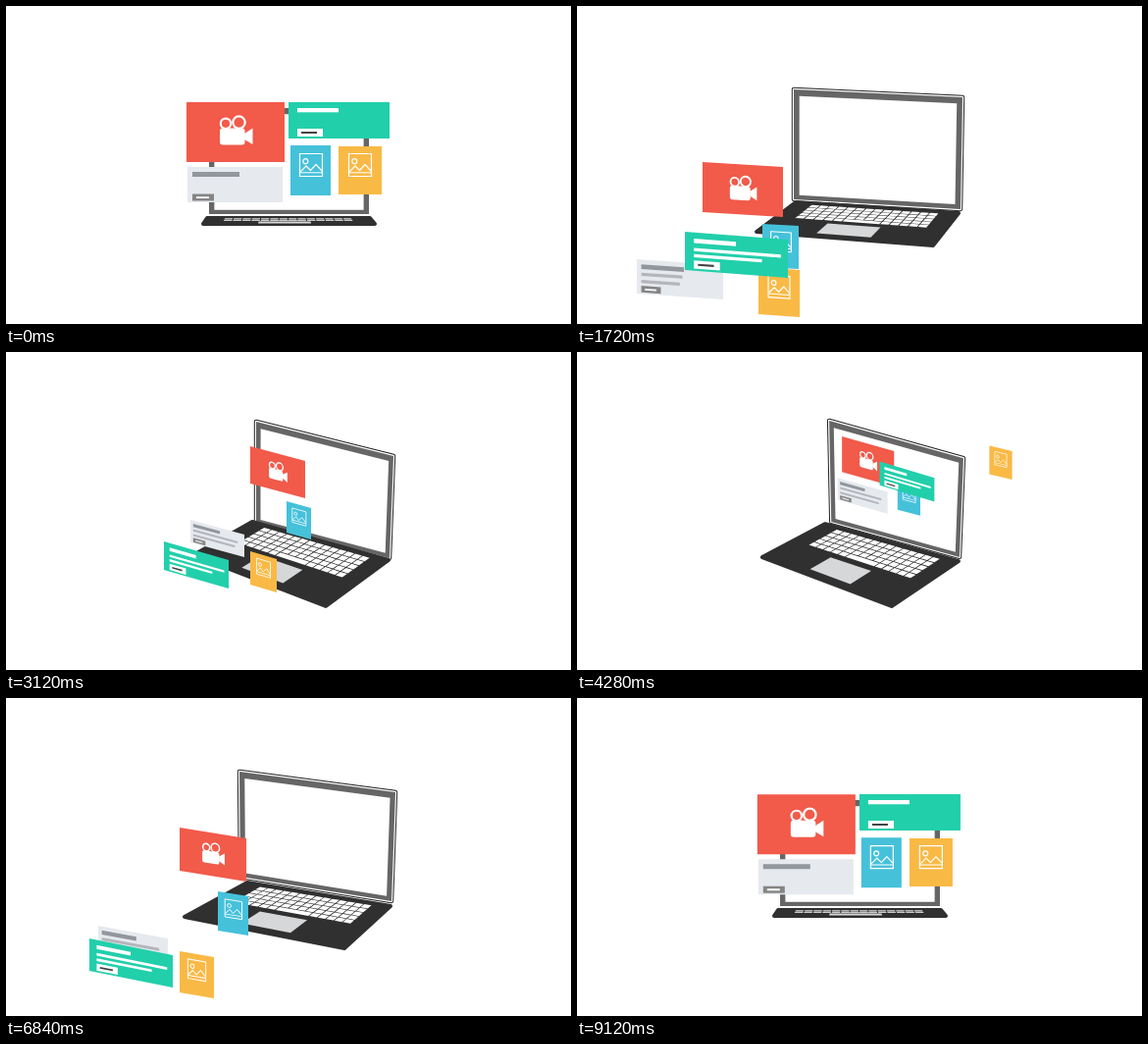
An HTML page with a canvas that plays this animation: 576 px wide and 324 px high, repeating every 9.16 s.

```html
<!DOCTYPE html>
<html lang="en">
<head>
<meta charset="utf-8">
<title>Laptop panels</title>
<style>
html, body { margin: 0; width: 100%; height: 100%; overflow: hidden; background: #fff; }
canvas { display: block; width: 576px; height: 324px; }
</style>
</head>
<body>
<canvas id="stage" width="576" height="324"></canvas>
<script>
const ctx = document.getElementById('stage').getContext('2d');
const LOOP = 9160, STEP = 40;

// The scene plays forward for half the loop, then backward.
const TIMES = [0, 1040, 1720, 2320, 3120, 3720, 4580];

// Corner paths: top left, top right, bottom right, bottom left.
const LID = [
  [207, 104, 370, 104, 370, 212, 207, 212],
  [211, 97, 382, 97, 382, 209, 212, 207],
  [221, 85, 393, 93, 391, 207, 221, 197],
  [238, 75, 397, 96, 393, 207, 239, 182],
  [255, 71, 395, 106, 391, 210, 255, 174],
  [257, 70, 394, 108, 390, 209, 259, 173],
  [257, 70, 394, 108, 390, 209, 259, 173]
];
const BASE = [
  [205, 216, 371, 216, 376, 222, 201, 222],
  [208, 211, 380, 213, 372, 232, 193, 229],
  [223, 200, 389, 211, 363, 244, 183, 230],
  [246, 188, 392, 212, 345, 255, 182, 223],
  [251, 173, 390, 212, 326, 259, 191, 207],
  [253, 175, 389, 213, 321, 259, 189, 209],
  [253, 175, 389, 213, 321, 259, 189, 209]
];

// Panel poses: left, top, width, drop of the top edge, height.
const PANELS = [
  { size: [97, 36], color: '#e6e9ee', art: drawNote, poses: [
    [185, 164, 97, 0, 36], [105, 224, 100, 2, 36], [61, 258, 88, 6, 35],
    [94, 232, 71, 13, 30], [188, 171, 55, 15, 23], [248, 138, 52, 15, 23], [266, 128, 51, 14, 22]] },
  { size: [100, 61], color: '#f25a4a', art: drawCamera, poses: [
    [184, 98, 100, 0, 61], [133, 146, 94, 1, 57], [128, 159, 82, 5, 51],
    [177, 132, 68, 11, 44], [249, 96, 56, 15, 38], [266, 88, 54, 15, 37], [270, 86, 53, 15, 36]] },
  { size: [41, 51], color: '#45c1da', art: () => drawPicture(9, 8), poses: [
    [290, 142, 41, 0, 51], [222, 197, 42, 1, 50], [189, 222, 37, 2, 44],
    [216, 197, 31, 5, 40], [286, 152, 25, 7, 32], [320, 134, 24, 6, 31], [326, 130, 23, 6, 31]] },
  { size: [44, 49], color: '#f9b945', art: () => drawPicture(10, 7), poses: [
    [339, 143, 44, 0, 49], [262, 207, 47, 1, 52], [185, 266, 42, 3, 48],
    [177, 258, 35, 6, 42], [249, 203, 27, 8, 34], [313, 163, 27, 7, 32], [450, 77, 22, 5, 28]] },
  { size: [103, 37], color: '#22cfab', art: drawArticle, poses: [
    [288, 98, 103, 0, 37], [208, 158, 110, 1, 40], [110, 230, 105, 8, 39],
    [85, 245, 85, 17, 33], [161, 193, 66, 19, 29], [245, 147, 60, 19, 26], [322, 104, 55, 16, 24]] }
];

const clamp = v => Math.max(0, Math.min(1, v));

function slope(keys, i, c) {
  if (i === 0 || i === TIMES.length - 1) return 0;
  const a = TIMES[i] - TIMES[i - 1], b = TIMES[i + 1] - TIMES[i];
  const before = (keys[i][c] - keys[i - 1][c]) / a;
  const after = (keys[i + 1][c] - keys[i][c]) / b;
  return (before * b + after * a) / (a + b) * (i === 1 ? 1.5 : 1);
}

// Smooth curve through a list of poses.
function poseAt(keys, t) {
  let i = 0;
  while (i < TIMES.length - 2 && t >= TIMES[i + 1]) i++;
  const span = TIMES[i + 1] - TIMES[i];
  const s = (t - TIMES[i]) / span, r = 1 - s;
  return keys[i].map((v, c) =>
    v * (1 + 2 * s) * r * r + keys[i + 1][c] * s * s * (3 - 2 * s) +
    span * s * r * (slope(keys, i, c) * r - slope(keys, i + 1, c) * s));
}

function bar(x, y, w, h, color) {
  ctx.fillStyle = color;
  ctx.fillRect(x, y, w, h);
}

function trace(points, close) {
  ctx.beginPath();
  points.forEach(([x, y]) => ctx.lineTo(x, y));
  if (close) ctx.closePath();
}

// A rectangle given in fractions of a four-cornered surface.
function patch(q, u0, v0, u1, v1) {
  const at = (u, v) => [0, 1].map(k =>
    (q[k] * (1 - u) + q[k + 2] * u) * (1 - v) + (q[k + 6] * (1 - u) + q[k + 4] * u) * v);
  trace([at(u0, v0), at(u1, v0), at(u1, v1), at(u0, v1)], true);
}

function fillPatch(q, u0, v0, u1, v1, color) {
  patch(q, u0, v0, u1, v1);
  ctx.fillStyle = color;
  ctx.fill();
}

function strokePath(width, color) {
  ctx.lineWidth = width;
  ctx.strokeStyle = color;
  ctx.stroke();
}

function drawLaptop(t) {
  const lid = poseAt(LID, t), base = poseAt(BASE, t);
  ctx.lineJoin = 'round';

  patch(lid, 0, 0, 1, 1);
  ctx.globalAlpha = clamp(t / 1000);
  strokePath(4.4, '#222');
  ctx.globalAlpha = 1;
  strokePath(2.4, '#fff');
  fillPatch(lid, 0, 0, 1, 1, '#666');
  fillPatch(lid, 0.033, 0.058, 0.967, 0.96, '#fff');

  fillPatch(base, 0, 0, 1, 1, '#303030');
  strokePath(4, '#303030');
  const rows = 5, cols = 14, u0 = 0.11, v0 = 0.05;
  const du = 0.78 / cols, dv = 0.45 / rows;
  for (let r = 0; r < rows; r++) {
    for (let c = 0; c < cols; c++) {
      const u = u0 + c * du, v = v0 + r * dv;
      if (r === rows - 1 && c > 4 && c < 9) continue;
      fillPatch(base, u, v, u + du * 0.88, v + dv * 0.86, '#fff');
    }
  }
  const v = v0 + 4 * dv;
  fillPatch(base, u0 + 5 * du, v, u0 + 8.88 * du, v + dv * 0.86, '#fff');
  fillPatch(base, 0.32, 0.58, 0.63, 0.9, '#d6d7d8');
}

function drawCamera() {
  [[40, 21.8, 5.2], [53.5, 20.6, 6.2]].forEach(([x, y, r]) => {
    ctx.beginPath();
    ctx.arc(x, y, r, 0, 7);
    strokePath(2.2, '#fff');
  });
  ctx.fillStyle = '#fff';
  ctx.beginPath();
  ctx.roundRect(34, 26.5, 25.5, 17, 3);
  ctx.fill();
  trace([[59, 32], [67.5, 26.5], [67.5, 43], [59, 38]], true);
  ctx.fill();
}

function drawPicture(x, y) {
  ctx.translate(x, y);
  ctx.beginPath();
  ctx.rect(0.5, 0.5, 23, 23);
  strokePath(1.2, '#fff');
  ctx.beginPath();
  ctx.arc(6.3, 8.2, 2.5, 0, 7);
  strokePath(1.2, '#fff');
  trace([[1, 19], [7, 13], [11.5, 17.5], [17, 11.5], [23, 18]]);
  strokePath(1.2, '#fff');
  bar(1, 19.3, 22, 1, '#fff');
}

function drawArticle(t) {
  const grow = clamp((t - 400) / 900);
  bar(9, 6, 42, 4.3, '#fff');
  bar(9, 15, 87 * grow, 3, '#fff');
  bar(9, 21, 68 * grow, 3, '#fff');
  bar(9, 27, 26, 8, '#fff');
  bar(13, 30, 16, 2, '#444');
}

function drawNote(t) {
  const grow = clamp((t - 970) / 1300);
  bar(5, 5, 48, 5, '#92969d');
  bar(5, 13.7, 80 * grow, 3.4, '#b4b6bc');
  bar(5, 21.3, 75 * grow, 3.4, '#b4b6bc');
  bar(5, 27.5, 22, 7, '#858585');
  bar(9, 30.2, 13, 1.8, '#fff');
}

function drawPanel(panel, t) {
  const [x, y, w, drop, h] = poseAt(panel.poses, t);
  const [pw, ph] = panel.size;
  ctx.save();
  ctx.transform(w / pw, drop / pw, 0, h / ph, x, y);
  bar(0, 0, pw, ph, panel.color);
  panel.art(t);
  ctx.restore();
}

function frame() {
  const now = Math.floor(performance.now() % LOOP / STEP) * STEP;
  const t = Math.min(now, LOOP - now);
  bar(0, 0, 576, 324, '#fff');
  drawLaptop(t);
  PANELS.forEach(panel => drawPanel(panel, t));
  requestAnimationFrame(frame);
}
frame();
</script>
</body>
</html>
```
